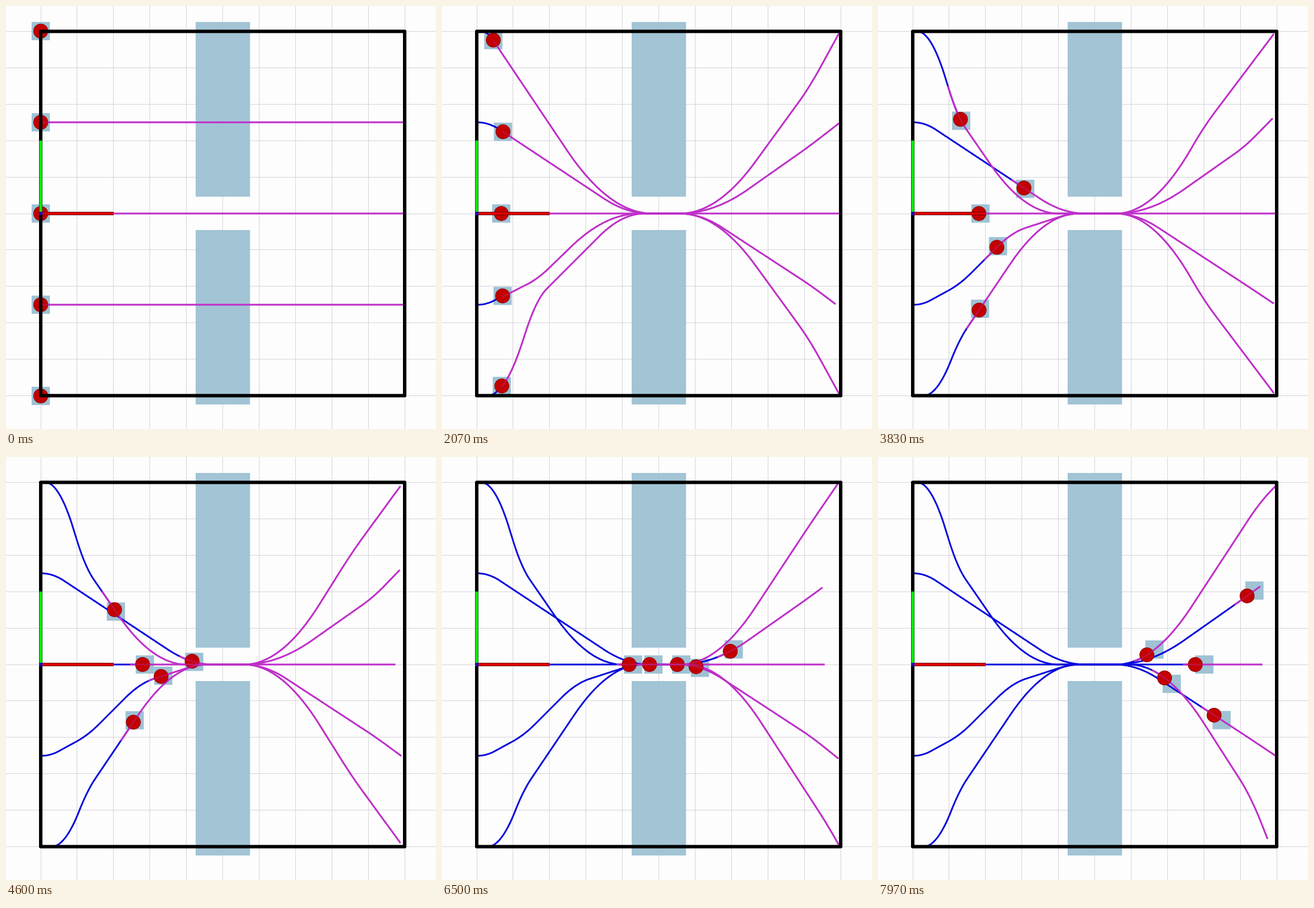
Recreate the animation shown at these times as an HTML page with a canvas. Size 755x742 px, loop 8 s.

```html
<!DOCTYPE html>
<html lang="en">
<head>
<meta charset="utf-8">
<title>Robots passing a gap</title>
<style>
  html, body { margin: 0; width: 100%; height: 100%; overflow: hidden; background: #fdfdfd; }
  canvas { display: block; }
</style>
</head>
<body>
<canvas id="stage" width="755" height="742"></canvas>
<script>
const ctx = document.getElementById('stage').getContext('2d');
const LOOP = 8000, LEFT = 61, RIGHT = 700, TOP = 44.5, BOTTOM = 683.5, MID = 364, NECK = 380, CELL = 63.9;
const DEPART = 1010, PLAN_START = 1500, KEY_TIMES = [2070, 3830, 5400, 6500, 7970];
const BLUE = '#0808dc', MAGENTA = '#be31c8', SHELF = '#9fc2d4';

const clamp01 = u => Math.min(1, Math.max(0, u));
const mix = (a, b, u) => a + (b - a) * u;

// Zero, then rising with slope 1, blended by a parabola over -r..r.
function ramp(u, r) {
  return Math.abs(u) < r ? (u + r) ** 2 / (4 * r) : Math.max(0, u);
}

// y(x) along the polyline of [x, y, r] vertices, each corner rounded over x - r..x + r.
function rounded(vertices) {
  const slopes = vertices.slice(1).map(([x, y], i) => (y - vertices[i][1]) / (x - vertices[i][0]));
  const [x0, y0] = vertices[0];
  return x => slopes.slice(1).reduce((y, slope, i) => {
    const [cornerX, , r = 0] = vertices[i + 1];
    return y + (slope - slopes[i]) * ramp(x - cornerX, r);
  }, y0 + slopes[0] * (x - x0));
}

const lead = rounded([[0, 0], [2070, 0], [6500, 7], [LOOP, 16]]); // goal square ahead of robot
const overlap = t => 22 * clamp01((t - 2070) / 1700);             // plan reaching back behind robot

// One exit: [start of the fan, bend x, bend y, end x, end y].
const exitCurve = ([fanX, bendX, bendY, endX, endY], spread) =>
  rounded([[NECK, MID], [fanX, MID, spread], [bendX, bendY, 20], [endX, endY]]);

const mirror = ([fanX, bendX, bendY, endX, endY]) => [fanX, bendX, 2 * MID - bendY, endX, 2 * MID - endY];

// Approaches are corners between the start row and the neck; there is one exit per key time.
function robot(row, stops, spread, firstCorners, corners, exits) {
  const approach = list => rounded([[60, row], ...list, [NECK, MID]]);
  const settled = approach(corners), out = exitCurve(exits[exits.length - 1], spread);
  return {
    row, spread, exits, settled,
    first: approach(firstCorners),
    y: x => x < NECK ? settled(x) : out(x),
    x: rounded([[0, LEFT], [DEPART, LEFT, 150], ...stops.map((x, i) => [KEY_TIMES[i], x, 100])])
  };
}

const outerExits = [
  [484, 645, 143, 697, 48],
  [484, 572, 212, 695, 49],
  [484, 645, 120, 690, 53],
  [484, 645, 120, 695, 47],
  [484, 670, 80, 698, 51]
];
const lateExits = [[494, 680, 650, 697, 681], [506, 655, 596, 684, 670]];
const innerExits = (fanX, bendX, bendY, ends) => ends.map(end => [fanX, bendX, bendY, ...end]);

const upperCorners = [[82, 204, 20], [324, MID, 40]];
const robots = [
  robot(44, [90, 144, 239, 328, 472], 66,
    [[79, 44, 18], [294, MID, 75]],
    [[93, 44, 25], [139, 193, 15], [257, MID, 60]],
    outerExits),
  robot(204, [106, 256, 400, 506, 648], 60, upperCorners, upperCorners,
    innerExits(477, 645, 246, [[698, 205], [693, 197], [690, 199], [668, 229], [671, 227]])),
  robot(MID, [104, 176, 306, 413, 557], 0, [], [],
    innerExits(477, 645, MID, [[697, MID], [697, MID], [670, MID], [672, MID], [675, MID]])),
  robot(524, [106, 208, 339, 446, 590], 38,
    [[78, 524, 15], [168, 479, 20], [287, MID, 60]],
    [[78, 524, 15], [144, 488, 20], [235, 397, 25], [337, MID, 20]],
    innerExits(454, 650, 492, [[691, 523], [695, 522], [693, 527], [696, 529], [698, 524]])),
  robot(684, [105, 177, 272, 364, 503], 66,
    [[110, 684, 30], [166, 514, 18], [316, MID, 40]],
    [[104, 684, 25], [142, 586, 15], [292, MID, 60]],
    [...outerExits.slice(0, 3).map(mirror), ...lateExits])
];

function planAt(bot, t) {
  if (t < PLAN_START) return { y: () => bot.row, end: 697 };
  const i = Math.max(0, KEY_TIMES.slice(1, -1).filter(key => t > key).length);
  const u = clamp01((t - KEY_TIMES[i]) / (KEY_TIMES[i + 1] - KEY_TIMES[i]));
  const exit = bot.exits[i].map((value, k) => mix(value, bot.exits[i + 1][k], u));
  const out = exitCurve(exit, bot.spread);
  const settling = clamp01((t - KEY_TIMES[0]) / 800);
  return {
    y: x => x < NECK ? mix(bot.first(x), bot.settled(x), settling) : out(x),
    end: exit[3]
  };
}

function rect(x, y, w, h, color) {
  ctx.fillStyle = color;
  ctx.fillRect(x, y, w, h);
}

function disc(x, y, r, color) {
  ctx.fillStyle = color;
  ctx.beginPath();
  ctx.arc(x, y, r, 0, 2 * Math.PI);
  ctx.fill();
}

function plot(y, from, to, color) {
  if (to <= from) return;
  ctx.strokeStyle = color;
  ctx.lineWidth = 3;
  ctx.beginPath();
  for (let x = from; x < to; x += 2) ctx.lineTo(x, y(x));
  ctx.lineTo(to, y(to));
  ctx.stroke();
}

function drawGrid() {
  for (let i = 0; i <= 10; i++) {
    rect(Math.round(LEFT - .5 + i * CELL), 0, 1, 742, '#d3d3dc');
    rect(0, Math.round(TOP - .5 + i * CELL), 755, 1, '#d3d3dc');
  }
}

function drawAxes() {
  rect(58, 236, 6, 128, '#067006');
  rect(59, 236, 4, 128, '#00f000');
  rect(61, 361, 128, 6, '#700606');
  rect(61, 362, 128, 4, '#e00000');
  rect(58, 361, 6, 6, '#1010c8');
}

function draw(t) {
  rect(0, 0, 755, 742, '#fdfdfd');
  drawGrid();
  ctx.globalAlpha = .96;
  rect(333, 28, 95.5, 306.5, SHELF);
  rect(333, 393, 95.5, 306, SHELF);
  ctx.globalAlpha = 1;

  const poses = robots.map(bot => {
    const x = bot.x(t), y = bot.y(x), slope = bot.y(x + 1) - y;
    const goalX = x + lead(t) / Math.hypot(1, slope);
    return { bot, x, y, goalX, goalY: bot.y(goalX), plan: planAt(bot, t) };
  });
  for (const p of poses) rect(p.goalX - 16, p.goalY - 16, 32, 32, SHELF);
  for (const p of poses) plot(p.bot.y, LEFT, p.x, BLUE);
  const drawPlans = () => poses.forEach(p =>
    plot(p.plan.y, Math.max(LEFT, p.x - overlap(t)), p.plan.end, MAGENTA));
  drawPlans();
  for (const p of poses) {
    disc(p.x, p.y, 13, '#8c0000');
    disc(p.x, p.y, 12, '#c20000');
  }
  // Plans show faintly through the robots.
  ctx.globalAlpha = .3;
  drawPlans();
  ctx.globalAlpha = 1;

  ctx.strokeStyle = '#000';
  ctx.lineWidth = 6;
  ctx.lineJoin = 'round';
  ctx.strokeRect(LEFT, TOP, RIGHT - LEFT, BOTTOM - TOP);
  drawAxes();
}

function tick(now) {
  draw(now % LOOP);
  requestAnimationFrame(tick);
}
requestAnimationFrame(tick);
</script>
</body>
</html>
```
